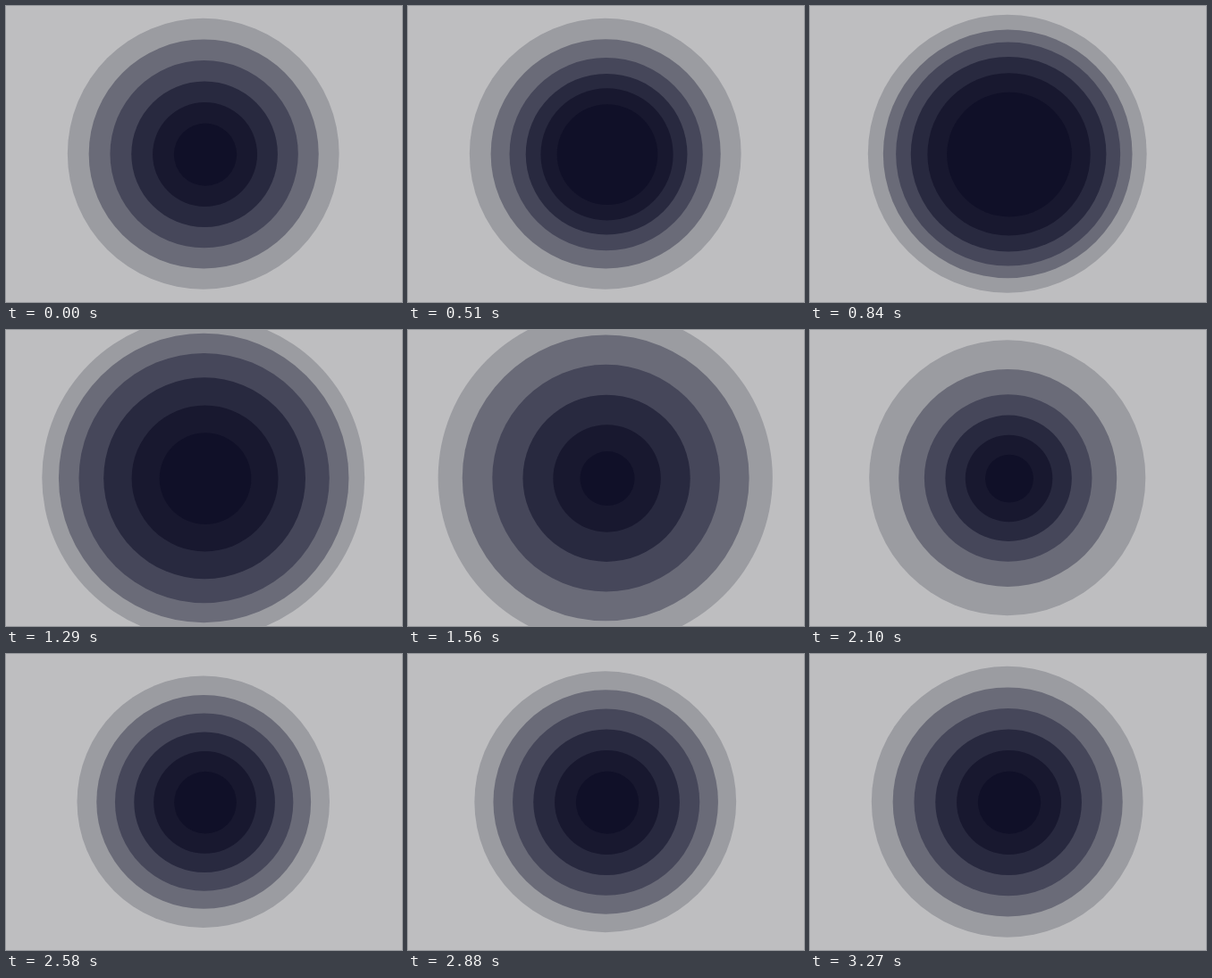
These frames come from a looping animation (443 px wide and 332 px high, 3.63 s). An HTML page with a canvas:

```html
<!DOCTYPE html>
<html lang="en">
<head>
<meta charset="utf-8">
<title>Pulsing rings</title>
<style>
  html, body { margin: 0; width: 100%; height: 100%; overflow: hidden; background: #bebec0; }
  canvas { display: block; width: 443px; height: 332px; }
</style>
</head>
<body>
<canvas id="stage" width="443" height="332"></canvas>
<script>
const ctx = document.getElementById('stage').getContext('2d');
const LOOP = 3630, STEP = 30, MOVE_FROM = 120, MOVE_TO = 3270;

// Inner to outer
const colors = ['#101028', '#18182f', '#28293f', '#46475a', '#6a6b78', '#9b9ca1'];
const delays = [55, 148, 272, 400, 560, 700];

// Swell, undershoot and settle: [time, radius offset]
const keys = [[-60, 0], [850, 35.2], [1725, -11.5], [2610, 0]];

const ease = p => (1 - Math.cos(Math.PI * p)) / 2;

function swell(t) {
  for (let i = 1; i < keys.length; i++) {
    const [t0, v0] = keys[i - 1], [t1, v1] = keys[i];
    if (t < t1) return v0 + (v1 - v0) * ease(Math.max(0, (t - t0) / (t1 - t0)));
  }
  return 0;
}

function draw(time) {
  const t = Math.floor((time % LOOP) / STEP) * STEP;
  const moving = t >= MOVE_FROM && t < MOVE_TO;
  ctx.fillStyle = '#bebec0';
  ctx.fillRect(0, 0, 443, 332);
  for (let k = colors.length - 1; k >= 0; k--) {
    const r = 35.1 + 23.36 * k + (moving ? swell(t - delays[k]) : 0);
    ctx.fillStyle = colors[k];
    ctx.beginPath();
    ctx.arc(223 - 0.45 * k, 166.6 - 0.17 * k, r, 0, Math.PI * 2);
    ctx.fill();
  }
}

const start = performance.now();
function tick() {
  draw(performance.now() - start);
  requestAnimationFrame(tick);
}
tick();
</script>
</body>
</html>
```
